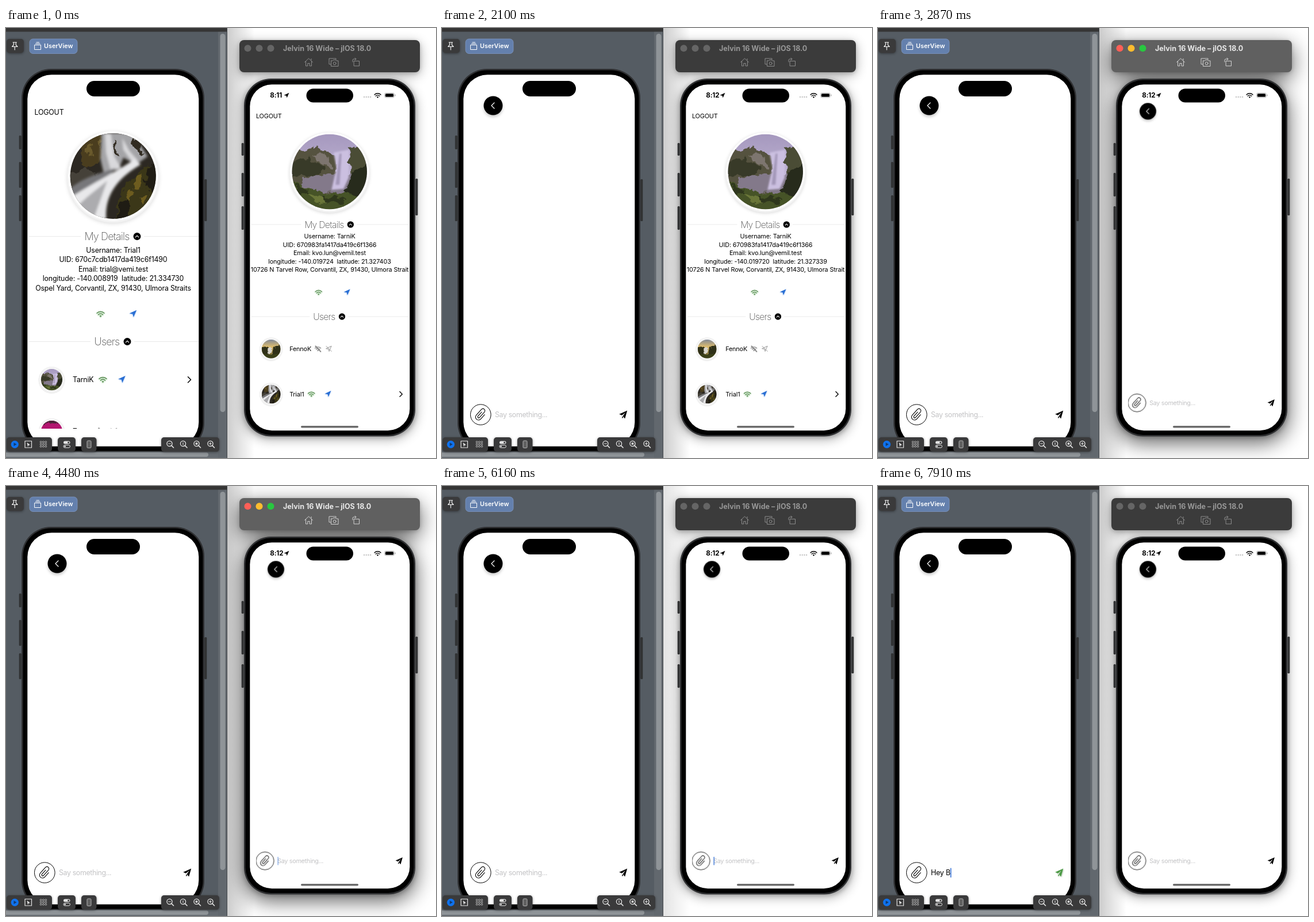
Write an HTML page that moves like this. It is 748 px wide and 748 px high and loops after 8000 ms.

```html
<!DOCTYPE html>
<html lang="en">
<head>
<meta charset="utf-8">
<title>Chat preview</title>
<style>
html, body { margin: 0; width: 100%; height: 100%; overflow: hidden; background: #fff; }
svg { display: block; width: 100vw; height: 100vh; }
text { font-family: Inter, Roboto, sans-serif; font-size: 12.4px; letter-spacing: -.015em; white-space: pre; }
.mid { text-anchor: middle; }
.head { font-size: 18px; font-weight: 200; letter-spacing: -.8px; fill: #4c4c4c; text-anchor: middle; }
.hint { fill: #c3c3c5; letter-spacing: -.03em; }
.line { fill: none; stroke: currentColor; stroke-linecap: round; stroke-linejoin: round; }
.lift { filter: drop-shadow(0 3px 2.5px rgba(0,0,0,.22)); }
.halo { filter: drop-shadow(0 2px 3px rgba(0,0,0,.13)); }
.wifi { color: #62905c; filter: drop-shadow(.5px 1px 1px #a9dca6); }
.nav { color: #2a6fd3; filter: drop-shadow(.5px 1px 1px #a9c8f4); }
.off { color: #8b8b8b; }
.send { color: #000; }
.send.ready { color: #4c9a45; filter: drop-shadow(1px 1px 1px #b5c9b2); }
.box { fill: #3a3a3b; filter: drop-shadow(0 1px 2px rgba(0,0,0,.4)); }

.shadow { opacity: .34; filter: blur(10px); transform: translateY(5px); }
.contact { opacity: .16; filter: blur(3px); }
.edge { opacity: 1; }
.bar { fill: #3b3b3b; }
.title { font-size: 12.5px; font-weight: 700; letter-spacing: 0; fill: #979797; }
.tools { color: #8c8c8c; }
.light { fill: #656565; }
[data-focus=none] .edge { opacity: .55; }
[data-focus=right] .shadow { opacity: .64; filter: blur(18px); transform: translateY(11px); }
[data-focus=right] .bar { fill: #606060; }
[data-focus=right] .title { fill: #e8e8e8; }
[data-focus=right] .tools { color: #d2d2d2; }
[data-focus=right] .light { fill: var(--on); }
</style>
</head>
<body>
<svg id="stage" viewBox="0 0 748 748" data-focus="left">
<defs>
  <linearGradient id="edgeFade"><stop stop-opacity=".2"/><stop offset="1" stop-opacity="0"/></linearGradient>
  <linearGradient id="sky" x2="0" y2="1"><stop stop-color="#a598be"/><stop offset="1" stop-color="#d2c8e2"/></linearGradient>
  <linearGradient id="dusk" x2="0" y2="1"><stop stop-color="#7f8798"/><stop offset=".4" stop-color="#dfbd6c"/><stop offset="1" stop-color="#4b4621"/></linearGradient>
  <clipPath id="round"><circle r="74.5"/></clipPath>
  <clipPath id="list"><path d="M-1 82H300V697H-1Z"/></clipPath>
  <filter id="rough" color-interpolation-filters="sRGB">
    <feTurbulence type="fractalNoise" baseFrequency=".07" numOctaves="3" seed="4"/>
    <feDisplacementMap in="SourceGraphic" scale="20" xChannelSelector="R" yChannelSelector="G"/>
    <feGaussianBlur stdDeviation=".7"/>
  </filter>
  <filter id="silk"><feGaussianBlur stdDeviation="2"/></filter>

  <g id="rapids" clip-path="url(#round)">
    <path fill="#2c2822" d="M-75-75H75V75H-75Z"/>
    <g filter="url(#rough)">
      <path fill="#4a3d1e" d="M-60-60L-22-80L-16-30L-50-12Z"/>
      <path fill="#6a5a2c" d="M-48-52L-38-56L-34-36L-42-30ZM-28-58L-22-62L-22-40Z"/>
      <path fill="#454139" d="M-80-5L-45-12L-25 2L-40 18L-80 36Z"/>
    </g>
    <g filter="url(#silk)">
      <path fill="#a4a4a7" d="M-20-75H34L60-34L40-20L18-32L10-12L-16-4L-22-30Z"/>
      <path fill="#d9d9dc" d="M-14-74L-4-74L2-34L14-14L-4-10L-12-40ZM16-66L28-44L42-28L34-24L18-46Z"/>
      <path fill="#77777a" d="M-75 22C-50 2-30-2 4-14L-20 20L-75 58Z"/>
      <path fill="#e8e8ea" d="M38-30C15-12-25 6-75 38L-64 75H-12C-14 40 0 8 48-20Z"/>
      <path fill="#acacaf" d="M-66 56C-44 34-26 22-10 8L-34 75H-56Z"/>
    </g>
    <g filter="url(#rough)">
      <path fill="#322c22" d="M0-64L8-56L14-34L6-40ZM28-72L48-56L52-38L38-48Z"/>
      <path fill="#3b3718" d="M52-14C24 8 2 30 4 80H80V-28Z"/>
      <path fill="#1f1c14" d="M62-24L80-14V40L56 20ZM10 46L28 36L30 80H4Z"/>
      <path fill="#6d5c1f" d="M40 0L54-4L50 26L34 24ZM22 30L32 22L28 48ZM46 38L58 30L52 52Z"/>
    </g>
  </g>
  <g id="falls" clip-path="url(#round)">
    <path fill="url(#sky)" d="M-75-75H75V75H-75Z"/>
    <g filter="url(#rough)">
      <path fill="#55523f" d="M-80-40L-30-46L0-38L14-30V44H-80Z"/>
      <path fill="#383a28" d="M-80-18L-40-28L-8-8L-28 8L-80 4Z"/>
      <path fill="#7d756f" d="M-34-34L-2-30L8-6L-12-12Z"/>
      <path fill="#83798a" d="M-50 12L-10 4L45 6L34 44L-60 38Z"/>
    </g>
    <path filter="url(#silk)" fill="#cbbfe0" d="M8-38L40-44L38 12L28 34L4 36L14-8Z"/>
    <path filter="url(#silk)" fill="#a397b8" d="M20-36L24-36L20 26H12Z"/>
    <g filter="url(#rough)">
      <path fill="#4a4c35" d="M38-46L80-62V10L42 6Z"/>
      <path fill="#272b1c" d="M80-18L50 0L30 32L42 62L80 50Z"/>
      <path fill="#465327" d="M-80 18L-44 32L0 44L34 40L60 54L44 80H-80Z"/>
      <path fill="#2f371d" d="M-72 24L-46 34L-40 46L-66 44ZM-12 52L20 48L34 62L4 66Z"/>
      <path fill="#6a7639" d="M-44 46L-20 50L0 58L-28 60Z"/>
    </g>
  </g>
  <g id="sunset" clip-path="url(#round)">
    <path fill="url(#dusk)" d="M-75-75H75V75H-75Z"/>
    <g filter="url(#rough)">
      <path fill="#2f3018" d="M-80-15L-25-18L-24 40L-80 80ZM80-34L16-12L10 45L80 80Z"/>
      <path fill="#d8d5ce" d="M-26-10L8-12L4 34L-28 38Z"/>
      <path fill="#3a3f19" d="M-80 40L0 46L80 36V80H-80Z"/>
    </g>
  </g>
  <g id="bloom" clip-path="url(#round)">
    <path fill="#b3146f" d="M-75-75H75V75H-75Z"/>
    <path filter="url(#rough)" fill="#4a2438" d="M-75-80H75V-62L20-54L-30-60L-75-40Z"/>
  </g>

  <g id="wifi">
    <path class="line" stroke-width="1.7" d="M-6.4-1.5A9 9 0 0 1 6.4-1.5M-3.9 1.1A5.5 5.5 0 0 1 3.9 1.1"/>
    <path fill="currentColor" d="M0 5.4L-2 3.2A2.8 2.8 0 0 1 2 3.2Z"/>
  </g>
  <path id="arrow" fill="currentColor" d="M6.2-6.2L.8 6L-.6.6L-6.4-.4Z"/>
  <g id="wifiOff" transform="scale(.9)"><use href="#wifi"/><path class="line" stroke="#fff" stroke-width="2.6" d="M-5-6L6 6"/><path class="line" stroke-width="1" d="M-6-6L6 6"/></g>
  <g id="arrowOff"><path class="line" d="M5.2-5.2L.8 5L-.4.4L-5-.4ZM-5-5.5L5.5 5"/></g>
  <g id="plane"><path fill="currentColor" d="M7-7L3 7L-.6 2.6L3.6-3.6L-2.2 1.2L-7-.8ZM-2 2.6L.2 4.4L-1.8 6.6Z"/></g>
  <path id="clip" class="line" stroke-width=".85" transform="rotate(42) scale(1.28)" d="M4-3.5V4.5A4 4 0 0 1-4 4.5V-6A2.7 2.7 0 0 1 1.4-6V4A1.4 1.4 0 0 1-1.4 4V-3.5"/>
  <g id="lens"><circle class="line" stroke-width="1.3" cx="-1" cy="-1" r="4.6"/><path class="line" stroke-width="1.6" d="M2.6 2.6L6 6"/></g>
</defs>

<path fill="#fff" d="M0 0H748V748H0Z"/>
<path class="edge" fill="url(#edgeFade)" d="M385 0H432V748H385Z"/>
<g class="shadow"><rect x="406" y="21" width="314" height="56" rx="9"/><rect x="413" y="88" width="300" height="622" rx="46"/></g>
<g class="contact"><rect x="406" y="22" width="314" height="57" rx="9"/><rect x="412" y="89" width="302" height="624" rx="46"/></g>

<g id="simulator"></g>
<g id="preview"></g>
</svg>

<script>
const $ = id => document.getElementById(id);
const label = (x, y, s, attrs = '') => `<text x="${x}" y="${y}" ${attrs}>${s}</text>`;
const icon = (name, x, y, cls = '', scale = 1) =>
  `<g class="${cls}" transform="translate(${x} ${y}) scale(${scale})"><use href="#${name}"/></g>`;
const box = (x, y, w, h, fill, r = 0, more = '') =>
  `<rect x="${x}" y="${y}" width="${w}" height="${h}" rx="${r}" fill="${fill}" ${more}/>`;
const line = (d, width = 1) => `<path class="line" stroke-width="${width}" d="${d}"/>`;

function phone(x, y, w, h, r, keys, power) {
  const key = (kx, [top, bottom]) => box(kx, top, 4, bottom - top, '#303132', 1.5);
  return keys.map(k => key(x - 4.3, k)).join('') + key(x + w + .3, power) +
    box(x, y, w, h, '#2e2f31', r) +
    box(x + 2.5, y + 2.5, w - 5, h - 5, '#000', r - 2.5) +
    box(x + 10.3, y + 10.3, w - 20, h - 20.6, '#fff', r - 9);
}

const avatar = (photo, x, y, scale) =>
  `<g transform="translate(${x} ${y}) scale(${scale})"><circle class="halo" cy="1" r="${scale < 1 ? 92 : 80}" fill="#f3f3f3"/>
   <circle r="78" fill="#fff"/><use href="#${photo}"/></g>`;

function heading(w, y, title, half) {
  const mid = w / 2 - 11, dot = mid + half + 13;
  return `<path stroke="#e9e9e9" d="M3 ${y}H${mid - half - 6}M${dot + 12} ${y}H${w - 1}"/>` +
    label(mid, y + 6.8, title, 'class="head"') +
    `<circle cx="${dot}" cy="${y}" r="6.5"/><g color="#fff">${line(`M${dot - 2.6} ${y + 1.3}l2.6-2.6l2.6 2.6`, 1.2)}</g>`;
}

function row(w, y, { photo, name, iconX, online }) {
  const states = online
    ? icon('wifi', iconX, y, 'wifi') + icon('arrow', iconX + 33, y - .5, 'nav') + line(`M${w - 19.5} ${y - 5}l5 5l-5 5`, 1.5)
    : icon('wifiOff', iconX, y, 'off') + icon('arrowOff', iconX + 21.5, y, 'off');
  return avatar(photo, 42.5, y, .25) + label(79, y + 4.5, name) + states;
}

function userView(side, w, photo, details, rows, firstRow) {
  const c = w / 2;
  return `<g id="${side}User" ${side === 'left' ? 'clip-path="url(#list)"' : ''}>` +
    label(12.5, 151.3, 'LOGOUT') + avatar(photo, c - .3, 257.5, 1) +
    heading(w, 362.5, 'My Details', 39.5) +
    details.map((s, i) => label(c, 390.5 + 16.5 * i, s, `class="mid" id="${side}Detail${i}"`)).join('') +
    icon('wifi', c - 22, 497.5, 'wifi') + icon('arrow', c + 34.5, 497, 'nav') +
    heading(w, 545.5, 'Users', 22.5) +
    rows.map((r, i) => row(w, firstRow + 90 * i, r)).join('') + '</g>';
}

function spinner(side, x, y) {
  const spokes = Array.from({ length: 8 }, (_, i) =>
    `<path d="M0-3.4V-7" stroke="#444" stroke-width="1.7" stroke-linecap="round" opacity="${.2 + .09 * i}" transform="rotate(${45 * i})"/>`);
  return `<g id="${side}Load" transform="translate(${x} ${y})"><g class="spin">${spokes.join('')}</g></g>`;
}

function chatView(side, w, backY, inputY) {
  return `<g id="${side}Chat"><circle class="lift" cx="52" cy="${backY}" r="16.5"/>
    <g color="#fff">${line(`M54 ${backY - 5}l-5 5l5 5`, 1.2)}</g>
    <circle cx="30.3" cy="${inputY}" r="17.8" fill="none" stroke="#000"/>` +
    icon('clip', 30.3, inputY) +
    label(55, inputY + 4.6, 'Say something...', `id="${side}Text" class="hint"`) +
    `<rect id="${side}Caret" x="55.3" y="${inputY - 8}" width="1.7" height="16.4" fill="#3f78d8"/>
    <g id="${side}Send" class="send" transform="translate(${w - 20.8} ${inputY})"><use href="#plane"/></g></g>`;
}

const town = 'Corvantil, ZX, 91430, Ulmora Straits';
const coords = (lon, lat) => `longitude: -140.${lon}  latitude: 21.${lat}`;
const tarni = { photo: 'falls', name: 'TarniK', iconX: 131.5, online: true };
const trial = { photo: 'rapids', name: 'Trial1', iconX: 122.5, online: true };
const fenno = { photo: 'sunset', name: 'FennoK', iconX: 135.5, online: false };
const zuzma = { photo: 'bloom', name: 'Zuzma', iconX: 129, online: false };

$('simulator').innerHTML =
  box(406, 21, 314, 56, '', 8, 'class="bar"') +
  ['#fe5f57', '#febc2e', '#28c840'].map((c, i) =>
    `<circle class="light" style="--on:${c}" cx="${420.5 + 20 * i}" cy="35.2" r="6"/>`).join('') +
  label(482, 39.5, 'Jelvin 16 Wide – jlOS 18.0', 'class="title"') +
  `<g class="tools">` +
    line('M519.5 59.5L526.5 53L533.5 59.5M521.5 58V66H524.8V61.5H528.2V66H531.5V58M531 56V53.5') +
    line('M564.5 63H562V53H574V55M566 57H568.5L569.5 55.5H573.5L574.5 57H578V66.5H565.5V57Z') +
    `<circle class="line" cx="571.7" cy="61.5" r="2.4"/>` +
    line('M605.5 57.5H614.5V66H605.5ZM603 59V56A2 2 0 0 1 605 54H609M607 52L609 54L607 56') + '</g>' +
  phone(414, 88, 298, 622.5, 47, [[200, 222], [252, 293], [310, 351]], [262, 326]) +
  box(522.5, 105.5, 81.5, 24, '#000', 12) +
  label(459.3, 121.2, '8:11', 'id="clock" style="font-size:11.6px;font-weight:650"') +
  icon('arrow', 488, 117.3, '', .72) +
  [623, 626.7, 630.4, 634.1].map(x => `<circle cx="${x}" cy="120" r="1.2" fill="#c4c4c4"/>`).join('') +
  icon('wifi', 646.5, 117.3, '', .85) +
  box(658.5, 113, 17, 8, 'none', 2.6, 'stroke="#a8a8a8" stroke-width=".8"') +
  box(659.8, 114.2, 14.4, 5.6, '#000', 1.6) + box(676.5, 115.5, 1.2, 3, '#a8a8a8', .6) +
  `<g transform="translate(424 24.7) scale(.875)">` +
    userView('right', 317.7, 'falls', ['Username: TarniK', 'UID: 670983fa1417da419c6f1366',
      'Email: kvo.lun@vemil.test', '', '10726 N Tarvel Row, ' + town.replace(/s$/, '')], [fenno, trial], 609.7) +
    spinner('right', 158.8, 439) + chatView('right', 317.7, 137.3, 717) + '</g>' +
  box(513, 692, 100, 3.4, '#6b6b6b', 1.7);

const toolbar = (x, w) => box(x, 712, w, 25, '', 5, 'class="box"');
$('preview').innerHTML =
  box(0, 0, 384.5, 748, '#555c63') +
  phone(27, 71, 318, 667, 51, [[187, 211], [233, 278], [291, 336]], [263, 336]) +
  box(140, 92, 93, 27, '#000', 13.5) +
  `<g transform="translate(37 0)">` +
    userView('left', 299, 'rapids', ['Username: Trial1', 'UID: 670c7cdb1417da419c6f1490',
      'Email: trial@vemi.test', coords('008919', '334730'), 'Ospel Yard, ' + town], [tarni, zuzma], 611.7) +
    spinner('left', 149, 415.5) + chatView('left', 299, 135, 672.6) + '</g>' +
  box(0, 737, 384.5, 11, '#656b71') + box(369, 6, 15.5, 742, '#62686e') +
  box(372.5, 10, 9, 658, '#8f9498', 4.5) + box(-6, 738.5, 358, 7.5, '#8f9498', 3.7) +
  box(0, 0, 384.5, 6.5, '#353535') + box(384, 0, 1, 748, '#44484c') +
  box(1, 19, 30, 24.5, '', 5, 'class="box"') + box(41, 19, 83, 25.5, '#6480ad', 6, 'stroke="#7f99c3" stroke-width=".8"') +
  label(66, 35.4, 'UserView', 'fill="#fff" style="font-size:10.8px;font-weight:600;letter-spacing:0"') +
  `<g color="#fff">` +
    line('M50 29.5H60.5V37.5H50ZM51.5 27.2H59M53 25H57.5') +
    line('M12 25H18.5M13.3 25V29.5L10.5 32.5H20L17.2 29.5V25M15.2 32.5V38', 1.1) + '</g>' +
  toolbar(1, 79) + toolbar(90, 31) + toolbar(131, 26.5) + toolbar(270, 101) +
  `<circle cx="15.3" cy="724.3" r="6.6" fill="#0f72ee"/><path fill="#123a6e" d="M13.5 721.3L18.5 724.3L13.5 727.3Z"/><g color="#e4e4e4">` +
    line('M33 718.5H44.5V730H33Z', 1.2) + '<path fill="currentColor" d="M36.5 721L42 725.4L39.3 725.8L38 728.4Z"/>' +
    [0, 1, 2, 3, 4, 5, 6, 7, 8].map(i => box(59.3 + 4.3 * (i % 3), 718.9 + 3.9 * (i / 3 | 0), 2.7, 2.4, 'none', .5, 'stroke="#c4c4c4" stroke-width=".8"')).join('') +
    box(100, 718.5, 11.5, 5, '#e4e4e4', 2.5) + '<circle cx="108.7" cy="721" r="1.6" fill="#3a3a3b"/>' +
    box(100, 725.5, 11.5, 4.6, 'none', 2.3, 'stroke="#e4e4e4"') + '<circle cx="102.6" cy="727.8" r="1.4" fill="#e4e4e4"/>' +
    box(141, 718, 7, 12.5, '#606060', 1.5, 'stroke="#b5b5b5"') +
    [285.5, 309, 332.5, 356.5].map(x => icon('lens', x, 724)).join('') +
    line('M282.5 723H286.5M308 721V725M353.5 723H357.5M355.5 721V725', 1.1) +
    box(329.7, 721.2, 3.6, 3.6, '#e4e4e4', .6) + '</g>';

// Step tables: [start in ms, value]
const blinkOut = t => [[t, .6], [t + 70, .3], [t + 140, 0]];
const blinkIn = t => [[t, .5], [t + 70, 1]];
const opacity = {
  leftUser: [[0, 1], [1260, 0]],
  leftLoad: [[0, 0], [1260, 1], [1400, 0]],
  leftChat: [[0, 0], [1400, .5], [1470, 1]],
  rightUser: [[0, 1], [2730, 0]],
  rightLoad: [[0, 0], [2730, 1], [2800, 0]],
  rightChat: [[0, 0], [2800, .5], [2870, 1]],
  leftCaret: [[0, 0], [7070, 1]],
  rightCaret: [[0, 0], [3850, 1], ...blinkOut(4480), ...blinkIn(4900), ...blinkOut(5530),
    ...blinkIn(5950), ...blinkOut(6580), ...blinkIn(6930), ...blinkOut(7630)],
};
const focus = [[0, 'left'], [2660, 'right'], [6090, 'none'], [6230, 'left']];
const clock = [[0, '8:11'], [2030, '8:12']];
const place = [[0, coords('019724', '327403')], [980, coords('019722', '327371')], [2100, coords('019720', '327339')]];
const typed = [[0, ''], [7140, 'H'], [7350, 'He'], [7420, 'Hey'], [7700, 'Hey '], [7910, 'Hey B']];

const at = (steps, t) => steps.findLast(([start]) => start <= t)[1];
function write(id, s) {
  const el = $(id);
  if (el.textContent !== s) el.textContent = s;
}

function draw(t) {
  for (const id in opacity) $(id).style.opacity = at(opacity[id], t);
  $('stage').dataset.focus = at(focus, t);
  write('clock', at(clock, t));
  write('rightDetail3', at(place, t));

  const message = at(typed, t), field = $('leftText');
  write('leftText', message || 'Say something...');
  field.setAttribute('class', message ? '' : 'hint');
  $('leftCaret').setAttribute('x', message ? 55 + field.getComputedTextLength() : 55.3);
  $('leftSend').setAttribute('class', message ? 'send ready' : 'send');

  const turn = `rotate(${45 * Math.floor(t / 70)})`;
  document.querySelectorAll('.spin').forEach(el => el.setAttribute('transform', turn));
}

function loop() {
  draw(performance.now() % 8000);
  requestAnimationFrame(loop);
}
loop();
</script>
</body>
</html>
```
